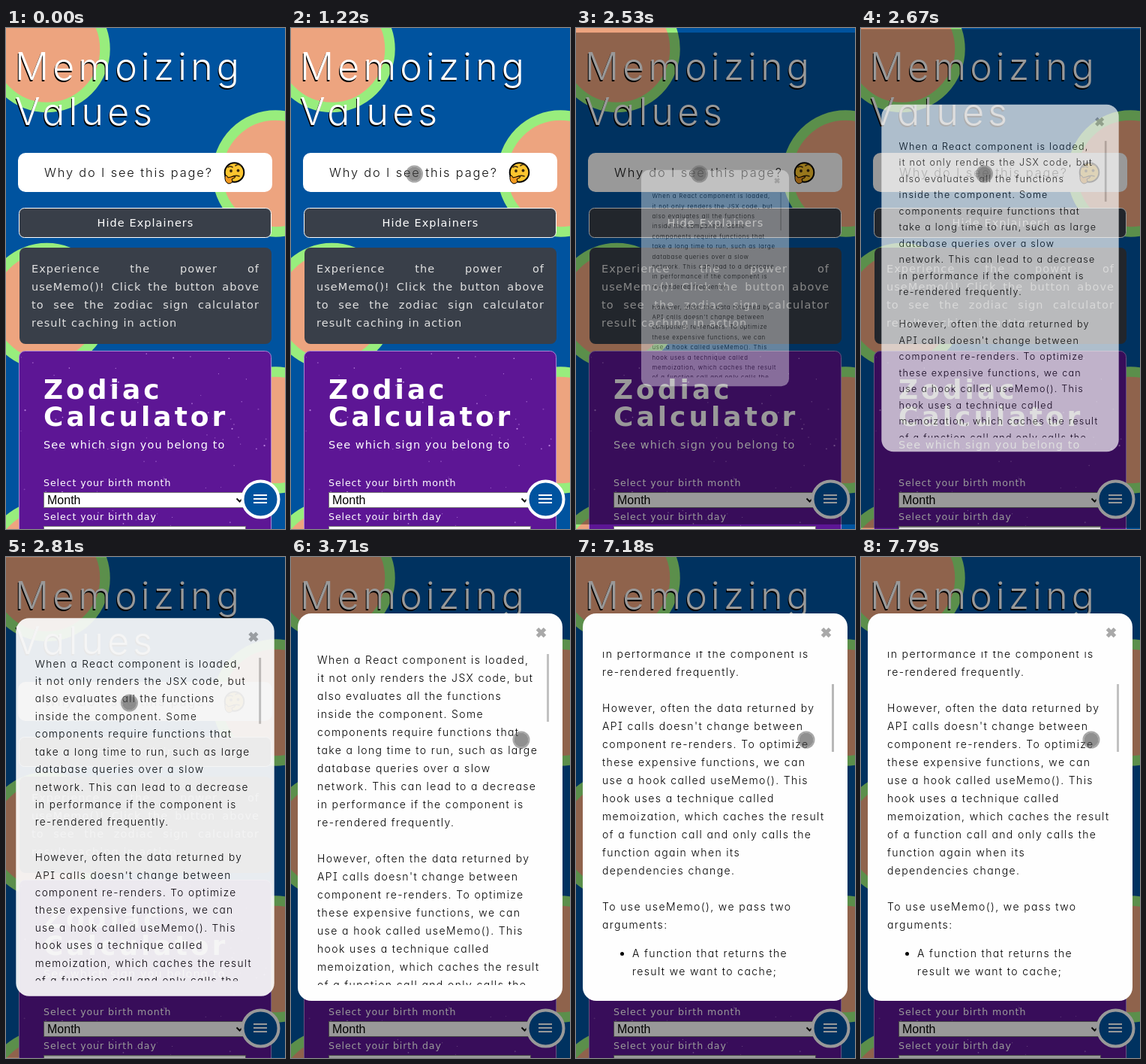
Animation of 372x666 px, one loop 8 s. Source, as an HTML page:

```html
<!DOCTYPE html>
<html lang="en">
<head>
<meta charset="utf-8">
<title>Memoizing Values</title>
<style>
  html, body { margin: 0; width: 100%; height: 100%; overflow: hidden; }
  body {
    background: #00539f;
    font-family: Inter, "Open Sans", sans-serif;
    font-feature-settings: "cv08", "cv11";
  }
  #stage { position: relative; width: 372px; height: 666px; overflow: hidden; }
  #stage > * { position: absolute; }
  #page { left: 0; top: 0; }
  #page text, #explain { font-family: "DejaVu Sans", Inter, sans-serif; }
  #page .body { font-size: 14.5px; letter-spacing: 1.05px; fill: #fff; }
  #page .label { font-size: 12.6px; letter-spacing: .9px; fill: #fff; }
  #page .big { font-size: 36px; font-weight: 700; letter-spacing: 4px; fill: #fff; }
  #page .ask { font: 300 16.4px Inter, "Open Sans", sans-serif; letter-spacing: 1.85px; fill: #111; }
  #page .field { font: 16px "Liberation Sans", Arial, sans-serif; fill: #000; }
  h1 {
    left: 12px; top: 21px; margin: 0;
    font-size: 50px; line-height: 60px; font-weight: 350; letter-spacing: 5.2px;
    color: #fff; text-shadow: -1px 2px 0 #000;
  }
  #explain {
    left: 18px; top: 292px; width: 336px; height: 128px; box-sizing: border-box;
    padding: 16px; border-radius: 8px; background: #393f49; color: #e1e1e1;
    font-size: 14.5px; line-height: 24px; letter-spacing: 1.05px;
  }
  #explain div { white-space: nowrap; text-align-last: justify; }
  #explain div:last-child { text-align-last: left; }
  #shade { inset: 0; background: rgba(0, 0, 0, .4); }
  #modal {
    left: 9px; top: 75px; width: 353px; height: 515px;
    border-radius: 18px; background: #fefefe;
  }
  #modal > * { position: absolute; }
  #close { left: 316px; top: 17px; }
  #view { left: 26px; top: 50px; width: 306px; height: 444px; overflow: hidden; }
  #text {
    font-size: 14px; line-height: 24px; font-weight: 300; letter-spacing: 1.38px;
    color: #000; white-space: pre;
  }
  #text ul { margin: 14px 0; padding-left: 40px; }
  #thumb { left: 332px; top: 54px; width: 3px; height: 90px; }
  #cursor {
    left: -11.5px; top: -11.5px; width: 19px; height: 19px; border-radius: 50%;
    background: rgba(70, 70, 70, .6); background-clip: padding-box;
    border: 2px solid rgba(110, 110, 110, .6);
  }
</style>
</head>
<body>
<div id="stage">
  <svg id="page" width="372" height="666">
    <g id="rings" fill="#eda47f" stroke="#98ed7d" stroke-width="13.5"></g>

    <rect x="16" y="166" width="339" height="52" rx="10" fill="#fff"/>
    <text class="ask" x="51" y="198">Why do I see this page?</text>
    <g fill="none" stroke="#3b2a10" stroke-linecap="round">
      <circle cx="304.5" cy="192" r="12.8" fill="#fcc52f" stroke="#000" stroke-width="2"/>
      <path d="M296 185q3-2 6 0M306 183q4-3 7.5 0" stroke-width="1.6"/>
      <path d="M301 198q5-3 10-1" stroke-width="1.6"/>
      <circle cx="300" cy="190" r="1.9" fill="#3b2a10" stroke="none"/>
      <circle cx="309.5" cy="189.5" r="1.9" fill="#3b2a10" stroke="none"/>
      <path d="M292 197q2-3 4 2l8-2q3 0 1 2l-4 2q3 5-4 6q-6-2-5-10z" fill="#f39a1f" stroke="#000"/>
    </g>

    <rect x="17.5" y="239.5" width="336" height="39" rx="7" fill="#393f49" stroke="#fff"/>
    <text class="body" x="186" y="264" text-anchor="middle">Hide Explainers</text>

    <rect x="17.5" y="429.5" width="336" height="260" rx="8" fill="#5d1695" stroke="#ad86d4"/>
    <g id="stars" fill="#c994ec"></g>
    <text class="big" x="50" y="493">Zodiac</text>
    <text class="big" x="50" y="529">Calculator</text>
    <text class="body" x="50" y="559">See which sign you belong to</text>
    <text class="label" x="50" y="609">Select your birth month</text>
    <text class="label" x="50" y="654">Select your birth day</text>
    <g fill="#fff" stroke="#767676">
      <rect x="50.5" y="617.5" width="269" height="20"/>
      <rect x="50.5" y="662.5" width="269" height="20"/>
    </g>
    <text class="field" x="55" y="633">Month</text>
    <path d="M307.5 625.5l4 4 4-4" fill="none" stroke="#111" stroke-width="2"/>

    <circle cx="339.5" cy="626.5" r="24" fill="#00539f" stroke="#fff" stroke-width="4"/>
    <path d="M330 621h18M330 626h18M330 631h18" stroke="#fff" stroke-width="2"/>
  </svg>

  <h1>Memoizing<br>Values</h1>
  <div id="explain">
    <div>Experience the power of</div>
    <div>useMemo()! Click the button above</div>
    <div>to see the zodiac sign calculator</div>
    <div>result caching in action</div>
  </div>

  <div id="shade"></div>
  <div id="modal">
    <svg id="close" width="18" height="18">
      <path d="M3.5 3.5l10 10M13.5 3.5l-10 10" stroke="#a9a9a9" stroke-width="5"/>
    </svg>
    <div id="view"><div id="text">When a React component is loaded,
it not only renders the JSX code, but
also evaluates all the functions
inside the component. Some
components require functions that
take a long time to run, such as large
database queries over a slow
network. This can lead to a decrease
in performance if the component is
re-rendered frequently.

However, often the data returned by
API calls doesn't change between
component re-renders. To optimize
these expensive functions, we can
use a hook called useMemo(). This
hook uses a technique called
memoization, which caches the result
of a function call and only calls the
function again when its
dependencies change.

To use useMemo(), we pass two
arguments:<ul><li>A function that returns the
result we want to cache;</li></ul></div></div>
    <div id="thumb"></div>
  </div>
  <div id="cursor"></div>
</div>

<script>
const LOOP = 8000;
const $ = id => document.getElementById(id);
const [shade, modal, text, thumb, cursor] =
  ["shade", "modal", "text", "thumb", "cursor"].map($);

function addCircle(parent, cx, cy, r) {
  const c = document.createElementNS("http://www.w3.org/2000/svg", "circle");
  c.setAttribute("cx", cx);
  c.setAttribute("cy", cy);
  c.setAttribute("r", r);
  parent.append(c);
  return c;
}

for (let i = 0; i < 3; i++) {
  addCircle($("rings"), 54.5, 28 + 342 * i, 77.5);
  addCircle($("rings"), 359.5, 193.5 + 341 * i, 77.5);
}

let seed = 11;
const random = () => (seed = seed * 16807 % 2147483647) / 2147483647;
for (let i = 0; i < 75; i++) {
  const star = addCircle($("stars"), 20 + random() * 330, 433 + random() * 230, 0.5 + random() * 0.6);
  star.setAttribute("opacity", 0.35 + random() * 0.6);
}

// Progress from a to b, clamped to 0..1
const span = (t, a, b) => Math.min(1, Math.max(0, (t - a) / (b - a)));
const mix = (a, b, p) => a + (b - a) * p;
const smooth = p => p * p * (3 - 2 * p);
const quadOut = p => 1 - (1 - p) ** 2;
const cubicOut = p => 1 - (1 - p) ** 3;
const quintInOut = p => p < .5 ? 16 * p ** 5 : 1 - 16 * (1 - p) ** 5;
const expoInOut = p =>
  p <= 0 ? 0 : p >= 1 ? 1 :
  p < .5 ? 2 ** (20 * p - 10) / 2 : 1 - 2 ** (10 - 20 * p) / 2;

function cursorAt(t) {
  if (t < 2850) {
    const p = quadOut(span(t, 330, 1220));
    return [mix(331, 164, p), mix(651, 193.5, p)];
  }
  const p = span(t, 2850, 3710);
  return [mix(164, 306.5, cubicOut(p)), mix(193.5, 242.5, quintInOut(p))];
}

// Thumb darkens on each scroll, then settles back
function thumbColor(t) {
  const since = t >= 7180 ? t - 7180 : t >= 5690 ? t - 5690 : LOOP;
  return since < 400 ? "#b8b8b8" : since < 540 ? "#bcbcbc" : "#c1c1c1";
}

function render(t) {
  shade.style.transform = `scaleY(${expoInOut(span(t, 1586, 2866))})`;

  modal.style.transform = `scale(${expoInOut(span(t, 1849, 3189))})`;
  modal.style.opacity = smooth(span(t, 2220, 2940));

  const notches = (t >= 5690) + (t >= 7180);
  text.style.transform = `translateY(${-100 * notches}px)`;
  thumb.style.transform = `translateY(${20 * notches}px)`;
  thumb.style.background = thumbColor(t);

  const [x, y] = cursorAt(t);
  cursor.style.transform = `translate(${x}px, ${y}px)`;
  cursor.style.visibility = t < 330 ? "hidden" : "visible";
}

const start = performance.now();
function tick() {
  render((performance.now() - start) % LOOP);
  requestAnimationFrame(tick);
}
tick();
</script>
</body>
</html>
```
